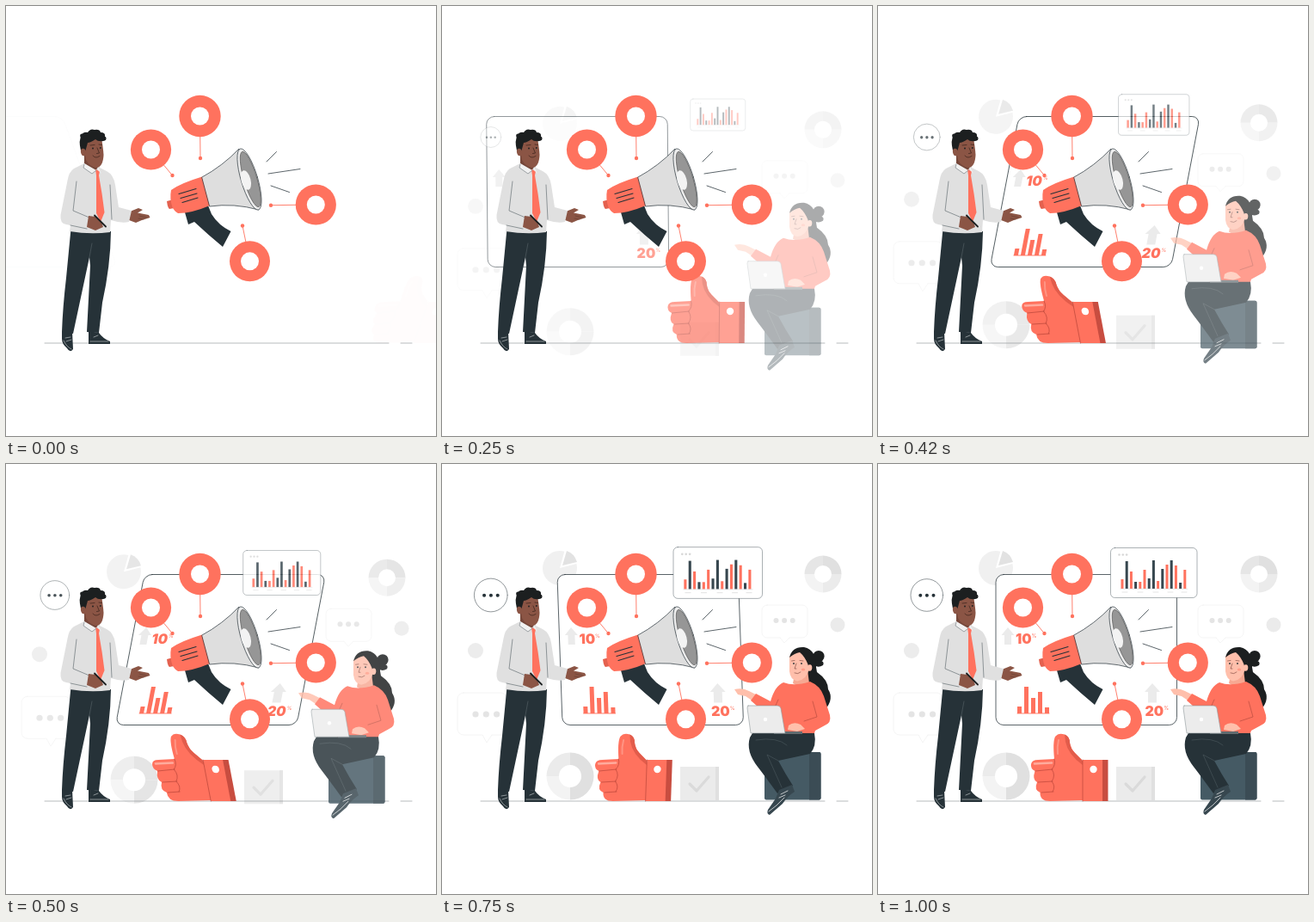
An HTML page with a canvas that plays this animation: 500x500 px, repeating every 1040 ms.

```html
<!DOCTYPE html>
<html lang="en">
<head>
<meta charset="utf-8">
<title>Marketing scene</title>
<style>
html, body { margin: 0; width: 100%; height: 100%; overflow: hidden; background: #fff; }
canvas { display: block; width: 500px; height: 500px; }
</style>
</head>
<body>
<canvas id="stage"></canvas>
<script>
const LOOP = 1040, SIZE = 500;
const CORAL = '#ff725e', DARK = '#263238', SHIRT = '#e0e0e0', BROWN = '#8b5545', SKIN = '#ffbfab';
const PALE = '#ebebeb', WHITE = '#fff', INK = '#1c1f20';

const stage = document.getElementById('stage');
const buffer = document.createElement('canvas');
const scale = Math.max(1, window.devicePixelRatio || 1);
for (const cv of [stage, buffer]) cv.width = cv.height = Math.round(SIZE * scale);
const main = stage.getContext('2d'), side = buffer.getContext('2d');
let c = main;

// Smooth curve through [time, value] points
function track(points) {
  const slope = i => {
    const a = points[Math.max(0, i - 1)], b = points[Math.min(points.length - 1, i + 1)];
    return (b[1] - a[1]) / (b[0] - a[0]);
  };
  return t => {
    let i = 0;
    while (i < points.length - 2 && t > points[i + 1][0]) i++;
    const [t0, v0] = points[i], [t1, v1] = points[i + 1];
    const d = t1 - t0, u = Math.min(1, Math.max(0, (t - t0) / d)), u2 = u * u, u3 = u2 * u;
    return v0 * (2 * u3 - 3 * u2 + 1) + v1 * (3 * u2 - 2 * u3)
      + d * (slope(i) * (u3 - 2 * u2 + u) + slope(i + 1) * (u3 - u2));
  };
}
const shiftAt = track([[0, 250], [4, 152], [8, 19], [10, -10], [14, 0], [18, 0], [24, 0]]);
const skewAt = track([[0, 20], [4, 8.8], [8, -7.6], [10, -10.8], [14, -9], [18, 2], [21, 0.9], [24, 0]]);
const riseAt = track([[0, 0], [4, 0.23], [8, 0.52], [10, 0.69], [14, 0.94], [18, 1], [24, 1]]);
const zoomAt = track([[0, 0.42], [4, 0.56], [8, 0.72], [10, 0.82], [14, 0.96], [18, 1.03], [24, 1]]);

function fill(d, color) {
  c.fillStyle = color;
  c.fill(new Path2D(d));
}
function line(d, color = DARK, width = 0.8) {
  c.strokeStyle = color;
  c.lineWidth = width;
  c.lineCap = c.lineJoin = 'round';
  c.stroke(new Path2D(d));
}
function disc(x, y, r, color) {
  c.fillStyle = color;
  c.beginPath();
  c.arc(x, y, r, 0, 7);
  c.fill();
}
function oval(x, y, rx, ry, tilt, color, edge, width = 0.7) {
  c.beginPath();
  c.ellipse(x, y, rx, ry, tilt, 0, 7);
  c.fillStyle = color;
  c.fill();
  if (edge) { c.strokeStyle = edge; c.lineWidth = width; c.stroke(); }
}
function bar(x, base, w, h, color) {
  c.fillStyle = color;
  c.fillRect(x, base - h, w, h);
}
function frame(x, y, w, h, r, edge, width) {
  c.beginPath();
  c.roundRect(x, y, w, h, r);
  c.fillStyle = WHITE;
  c.fill();
  c.strokeStyle = edge;
  c.lineWidth = width;
  c.stroke();
}
function dots(x, y, gap, r, color) {
  for (let i = 0; i < 3; i++) disc(x + i * gap, y, r, color);
}
function ring(x, y, r, hole, tones) {
  tones.forEach((tone, i) => {
    const a = -Math.PI / 2 + i * Math.PI / 2;
    c.beginPath();
    c.arc(x, y, r, a, a + Math.PI / 2);
    c.arc(x, y, hole, a + Math.PI / 2, a, true);
    c.fillStyle = tone;
    c.fill();
  });
}

// Draws a group on its own sheet so that it fades as one
function layer(alpha, place, draw) {
  if (alpha <= 0) return;
  side.setTransform(1, 0, 0, 1, 0, 0);
  side.clearRect(0, 0, buffer.width, buffer.height);
  side.setTransform(scale, 0, 0, scale, 0, 0);
  c = side;
  place();
  draw();
  c = main;
  main.save();
  main.setTransform(1, 0, 0, 1, 0, 0);
  main.globalAlpha = Math.min(1, alpha);
  main.drawImage(buffer, 0, 0);
  main.restore();
}
const raise = dy => () => c.translate(0, dy);
const slant = (dx, deg, cy) => () => {
  const k = Math.tan(deg * Math.PI / 180);
  c.transform(1, 0, k, 1, dx - cy * k, 0);
};
const grow = (k, x, y) => () => { c.translate(x, y); c.scale(k, k); c.translate(-x, -y); };

function backdrop() {
  c.beginPath();
  c.moveTo(137, 121);
  c.arc(137, 121, 20, -0.25, -1.3, false);
  c.fillStyle = '#f0f0f0';
  c.fill();
  fill('M140 118L145 101Q154 104 157 114Z', '#e2e2e2');
  ring(443, 128, 21.5, 10, ['#e0e0e0', PALE, '#f3f3f3', '#e6e6e6']);
  ring(149, 363, 27.5, 13, ['#e0e0e0', '#e0e0e0', '#f3f3f3', PALE]);
  disc(39, 217, 9, '#ececec');
  disc(460, 187, 8.5, PALE);
  frame(18, 266, 57, 49, 7, '#f1f1f1', 0.8);
  fill('M46 314H58L52 324Z', WHITE);
  line('M47 315L52 324L58 315', '#f1f1f1', 0.8);
  dots(39, 291, 12.3, 3.6, '#e4e4e4');
  frame(372, 164, 53, 38, 6, '#f3f3f3', 0.8);
  fill('M393 201H404L398 208Z', WHITE);
  line('M393 202L398 208L404 202', '#f3f3f3', 0.8);
  dots(388.5, 182, 9.6, 3, '#e4e4e4');
  bar(277, 391, 45, 39, PALE);
  bar(318, 391, 4, 39, '#e0e0e0');
  line('M288 372L296 380L310 364', '#dadada', 3.2);
}

function label(n, x, y) {
  c.fillStyle = CORAL;
  c.font = '900 16px Inter, sans-serif';
  c.fillText(n, x, y);
  const w = c.measureText(n).width;
  c.font = '400 6px Inter, sans-serif';
  c.fillText('%', x + w, y - 7.5);
}
function board() {
  frame(137, 128.5, 210.5, 175, 9, DARK, 0.75);
  fill('M151 190L158.5 199H155V210H147V199H143.5Z', PALE);
  fill('M319 255L328 265H324V277.5H314V265H310Z', PALE);
  label('10', 160, 209);
  label('20', 310.5, 293);
  [8, 31, 18, 25, 7].forEach((h, i) => bar(162 + i * 8, 290, 5, h, CORAL));
  line('M162 290H199', CORAL, 0.9);
}

function chart() {
  frame(270.5, 97.5, 100.5, 58, 5, '#46535a', 0.45);
  dots(280.5, 105.5, 4.3, 1.3, '#d8d8d8');
  const tones = 'cdcdccddcdcdcdc';
  [11, 32, 20, 8, 8, 22, 12, 33, 9, 23, 28, 33, 27, 7, 22].forEach((h, i) =>
    bar(282.5 + i * 5.2, 145, 3, h, tones[i] === 'c' ? CORAL : '#37474f'));
  line('M282 145.3H360', '#cfcfcf', 0.5);
  line('M284 149H290M302 149H308M320 149H326M337 149H343M353 149H359', '#ddd', 0.8);
}

function chat() {
  fill('M62 166L72 169L70 160Z', WHITE);
  oval(56.8, 152.5, 18.8, 18.8, 0, WHITE, DARK, 0.5);
  dots(49.3, 152.8, 7.6, 2, DARK);
}

function woman() {
  c.beginPath();
  c.roundRect(375, 335, 65.5, 55.5, 2);
  c.fillStyle = '#455a64';
  c.fill();
  fill('M427 335H438.5Q440.5 335 440.5 337V388.5Q440.5 390.5 438.5 390.5H427Z', '#3b4c55');
  fill('M424 217Q435 228 436 242Q449 251 449 262Q456 273 446 285Q441 272 431 262Q421 254 421 238Z', INK);
  disc(438, 223.5, 6.6, INK);
  fill('M434 228Q446 228 443 234Q437 238 431 233Z', INK);
  fill('M411 240L425 239L427 255Q416 261 408 255Z', '#f7a892');
  fill('M340 262Q350 260 357 264L369 270L365 278L353 270L344 268Z', SKIN);
  fill('M397 254Q410 259 428 253Q440 258 444 270L451 292Q453 301 445 304L434 310L432 316L385 315L387 284Q382 292 375 289L359 275L365 267L382 276Q387 258 397 254Z', CORAL);
  line('M386 285L391 274M431 276L436 294L421 299', '#b84c40', 0.7);
  fill('M404 224Q411 214 424 219L427 238Q424 251 413 252.5Q405 251 404 241Z', SKIN);
  fill('M404 225Q407 212 421 213Q436 216 435 238L428 246Q427 238 425.5 233Q422 224 416 219Q410 220 404 225Z', INK);
  oval(427.5, 237, 2.8, 3.8, 0.1, SKIN);
  disc(409, 232, 0.9, DARK);
  disc(418, 232, 0.9, DARK);
  line('M406.5 229L410 228.5M416 228.5L420 229M412 232L410 238H412M410 243Q414 245 417 242', '#733e36', 0.6);
  oval(420, 239, 2.2, 1.5, 0, '#ff9d88');
  fill('M361 313L433 313Q436 328 428 337L391 345Q399 360 408 374L390 383Q377 365 367 352Q353 334 358 318Z', DARK);
  line('M365 321Q390 317 401 327M391 345L378 338L395 376', '#4c595e', 0.6);
  fill('M392 379L407 373L410 381Q402 386 396 395L381 408Q377 407 379 402L388 389Z', '#37474f');
  line('M380 404Q389 398 398 388M394 384L402 380M392 388L399 385', WHITE, 0.7);
  fill('M403 304Q409 299 417 303L422 308L413 311L402 309Z', SKIN);
  fill('M386 311H419V314H386Z', '#616b6f');
  const lid = 'M356 281H390Q393 281 394 284L399 313H359L355 284Q355 281 356 281Z';
  fill(lid, '#ececec');
  line(lid, '#8c9599', 0.6);
  disc(376, 297, 2.2, '#fff');
}

function thumb() {
  fill('M205 343Q203 323 206 317Q210 312 217 314.5Q223 317 223 324Q224 331 229 336L237 344Q239 347 239 352V391L200 392Q188 392 188.5 382Q181 379 185 370Q179 367 182.5 357Q177 354 178 349Q179 344 186 344Z', CORAL);
  fill('M217 314.5Q223 317 223 324Q224 331 229 336L238 345V350Q221 338 218 323Z', '#e25c4b');
  line('M183 357L203 355M186 370L203 369M190 382L204 381M205 343Q207 350 202 355Q207 362 202 369Q207 375 203 381', '#ba463a', 0.7);
  line('M182 348.5L202 347.5', '#ffab9d', 2.6);
  line('M210 321Q208 329 209 337', '#ff9483', 2);
  fill('M238 344H262V392H238Z', CORAL);
  fill('M261 344H267.5V392H261Z', '#c84d40');
  line('M238 344V392', '#ba463a', 0.7);
  disc(250.5, 355, 4.2, WHITE);
}

function horn() {
  fill('M208 240L235 232L239 242Q247 255 261.5 262L252 280Q235 266 219 251L212 254Z', DARK);
  fill('M187 227L198 224L201 234L190 236Q188 235 187 227Z', '#e4614f');
  fill('M192 214Q203 206 228 198.5L237 232Q216 241 200 241Q196 239 193.5 234Q190 224 192 214Z', CORAL);
  line('M201 218.5L221 212.5M203 223.5L222 218M205 228.5L223 223', DARK, 1.1);
  const cone = 'M228 199Q252 186 271 166L294 237Q265 229 237 233Z';
  fill(cone, '#dedede');
  line(cone, DARK, 0.7);
  oval(283, 201.5, 9.7, 37, -0.29, '#ededed', DARK);
  oval(284.3, 201.5, 7.6, 33.5, -0.29, '#969696', '#555');
  oval(279, 202.5, 5.5, 11.5, -0.25, '#f3f3f3');
  line('M303 181L314.5 169.5M305 195L342 189.5M308 209L329.5 216.5', DARK, 0.75);
}

// Badge centre, radius and end of its connector
const badges = [[225.5, 128, 24.2, 226, 177], [168.5, 167, 23.6, 193.5, 197], [360.3, 231, 23.6, 308, 231.7], [283.5, 296.8, 23.5, 275, 255.5]];
function drawBadges() {
  for (const [x, y, r, ex, ey] of badges) {
    line(`M${x} ${y}L${ex} ${ey}`, CORAL, 0.9);
    disc(ex, ey, 2.2, CORAL);
    disc(x, y, r, CORAL);
    disc(x, y, 10.5, WHITE);
  }
}

function man() {
  fill('M65 379L77 379L78 399Q74.5 404 71 398Q65 393 65 387Z', DARK);
  fill('M96 378L108 380Q113 387 121 390V393H96Z', DARK);
  line('M67 389Q70 396 76 399M69 386L75 385M70 390L76 388M98 390H119M102 385L107 383', '#cfd4d6', 0.6);
  fill('M75.5 259L122 262Q121.5 302 112 345L108 380L94 379L98 302L97 292L78 381L65 379Q66 350 70 316Z', DARK);
  line('M97 292L100 276', '#59666b', 0.6);
  fill('M91 172L109 179L108 190Q101 196 91 186Z', '#75473a');
  fill('M144 239L154 235L159 237L153 240.5L166 243L167.5 246L158 249L151 252L143 249Z', BROWN);
  line('M155 244L163 246M154 247L160 248', '#5b382d', 0.5);
  fill('M91 183L79 189Q73 193 71.5 203L63.5 243Q62.5 253 70 254L75 255L74 262Q98 266 121 263L122 249Q134 253 143 251L146 238L131 234L127 208Q125 196 117 192L107 187L104 192Z', SHIRT);
  line('M82 204L78 238L97 246M121 208L123 248M75 255L94 259', '#687176', 0.7);
  fill('M104 190L109 192L108 197Q112 219 114.5 240L110 251L105 241Q105 214 105 197Z', CORAL);
  fill('M91 183L90 188L100 195L105 191ZM107 187L111 195L107 191Z', '#f1f1f1');
  line('M91 184L90 188L100 195L105 191', '#687176', 0.6);
  fill('M96 244L104 245L111 251L113 257L104 261L94 257Z', BROWN);
  line('M103 243.5L116 256.5', INK, 1.8);
  fill('M90 163L94 156L111 154Q113 165 113.5 173Q113 187 105 188Q97 187 93 179Z', BROWN);
  fill('M87 168Q84 156 88 150Q90 146 95 147Q98 142 103 144Q109 143 110 147Q116 147 115 152Q118 156 113 157Q107 158 104 155Q98 159 95 159L92.5 168L89 170Z', INK);
  disc(88.5, 151, 2.4, INK);
  disc(114, 154, 2.5, INK);
  oval(90, 170, 3, 4.3, -0.2, BROWN);
  disc(101, 165.5, 0.9, INK);
  disc(109.8, 165, 0.9, INK);
  line('M98 162L103 161.5M108 161L111.5 161.5M106 165L108.5 171L105.5 171.5M101 174Q104 178 109 174.5', '#38211b', 0.7);
}

function draw(n) {
  const on = n >= 2, rise = riseAt(n), fade = on ? rise : 0;
  const shift = shiftAt(n), skew = skewAt(n), dy = 25 * (1 - rise), zoom = zoomAt(n);
  const slide = on ? Math.min(1, 1 - shift / 250) : 0.012;
  c = main;
  c.setTransform(scale, 0, 0, scale, 0, 0);
  c.fillStyle = WHITE;
  c.fillRect(0, 0, SIZE, SIZE);
  layer(fade, raise(dy), backdrop);
  line('M45 392H445M459 392H472', '#6f777a', 0.5);
  layer(slide, slant(-shift, skew, 216), board);
  layer(fade, grow(zoom, 320.7, 126.5), chart);
  layer(fade, grow(zoom, 56.8, 152.5), chat);
  drawBadges();
  horn();
  man();
  layer(fade, raise(dy), woman);
  layer(slide, slant(shift, -skew, 353), thumb);
}

// 24 poses a second, start times rounded to 10 ms
const startOf = n => Math.round(n * 25 / 6) * 10;
function tick() {
  const t = performance.now() % LOOP;
  let n = 24;
  while (n > 0 && startOf(n) > t) n--;
  draw(n);
  requestAnimationFrame(tick);
}
tick();
</script>
</body>
</html>
```
